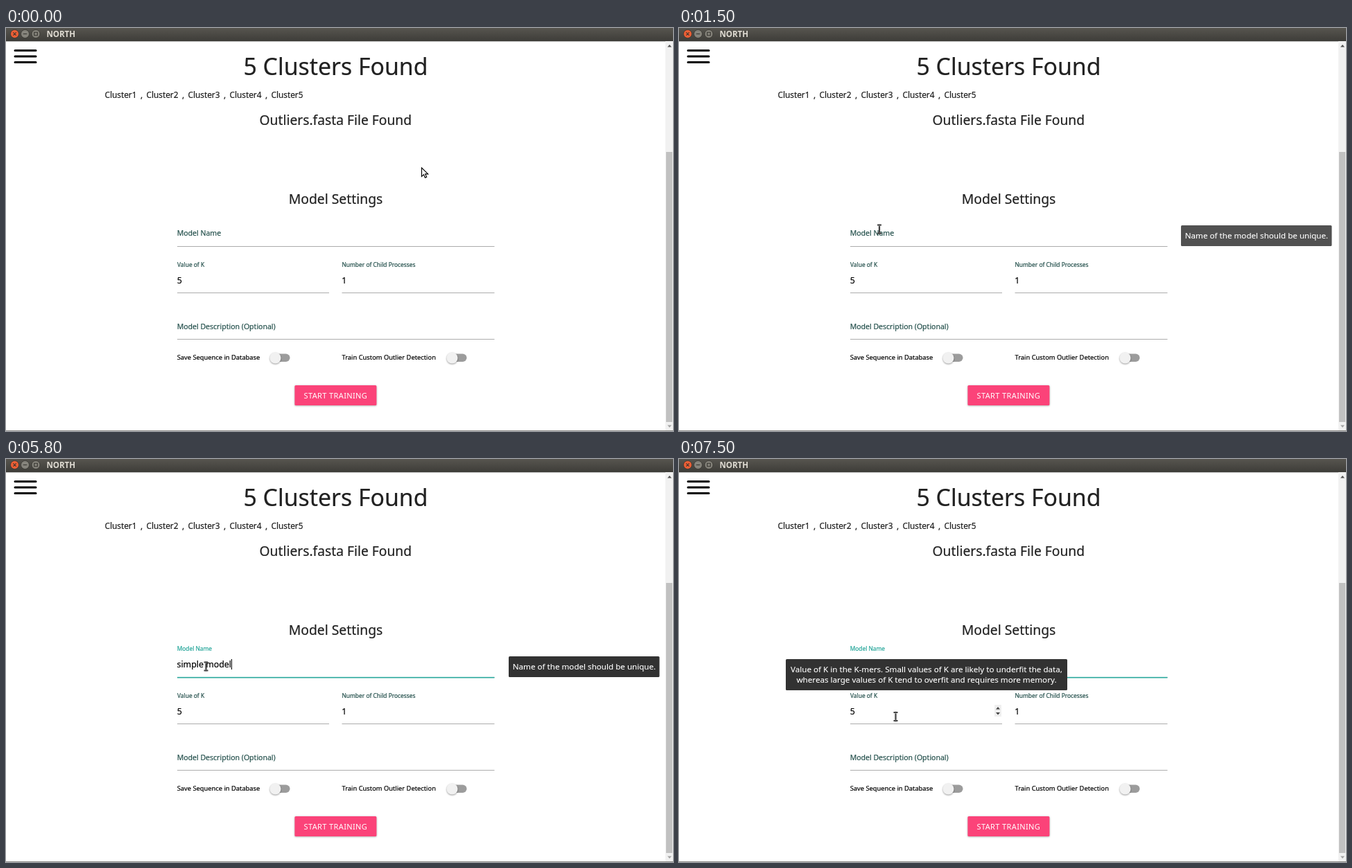
Animation of 962 by 582 pixels, one loop 8 s. Source, as an HTML page:

```html
<!DOCTYPE html>
<html lang="en">
<head>
<meta charset="utf-8">
<title>Model settings</title>
<style>
  html, body { margin: 0; width: 100%; height: 100%; overflow: hidden; background: #fff; }
  svg { display: block; width: 962px; height: 582px; }
  text {
    font-family: "Noto Sans", "Open Sans", sans-serif; white-space: pre;
    color: #212121; fill: currentColor; stroke: currentColor; stroke-width: .2px;
  }
  .center { text-anchor: middle; }
  .cluster { font-size: 11.8px; }
  .label { font-size: 10.52px; color: #24504c; }
  .small { font-size: 8.4px; color: #24504c; }
  .option { font-size: 9.32px; color: #000; }
  .value { font-size: 12.35px; color: #000; }
  .tip rect { fill: #323232; }
  .tip text { font-size: 11.62px; color: #fff; text-anchor: middle; stroke-width: .1px; }
  .line { fill: #9e9e9e; }
  .knob { fill: #f1f1f1; filter: drop-shadow(0 1px 1px rgba(0, 0, 0, .4)); }
  #button { fill: #fb4379; filter: drop-shadow(0 1.5px 1.2px rgba(0, 0, 0, .2)) drop-shadow(0 .5px 1.5px rgba(0, 0, 0, .15)); }
</style>
</head>
<body>
<svg viewBox="0 0 962 582">
  <defs>
    <linearGradient id="bar" x2="0" y2="1">
      <stop stop-color="#57554f"/>
      <stop offset="1" stop-color="#3d3c38"/>
    </linearGradient>
    <g id="switch">
      <rect x="-6" y="-6" width="27" height="11.5" rx="5.75" fill="#9c9c9c"/>
      <circle class="knob" r="8"/>
    </g>
  </defs>

  <!-- window frame -->
  <rect width="962" height="19.3" fill="url(#bar)"/>
  <g stroke="#35342f" stroke-width=".8">
    <circle cx="12.5" cy="8.5" r="6" fill="#ec5f35"/>
    <circle cx="27.5" cy="8.5" r="6" fill="#85837b"/>
    <circle cx="43" cy="8.5" r="6" fill="#85837b"/>
    <path d="M10.3 6.3l4.4 4.4m0-4.4l-4.4 4.4M24.8 8.5h5.4M40.7 6.2h4.6v4.6h-4.6z" fill="none" stroke-width="1.1"/>
  </g>
  <text x="58.5" y="13" font-size="11.5" font-weight="700" style="color:#dfdbd2; stroke:none">NORTH</text>
  <rect x="951" y="19" width="11" height="562" fill="#f1f1f1"/>
  <rect x="952" y="179" width="9" height="390" fill="#c1c1c1"/>
  <path d="M954 27.5h6l-3-3.5z" fill="#505050"/>
  <path d="M954 573.5h6l-3 3.5z" fill="#a3a3a3"/>
  <rect y="581" width="962" height="1" fill="#8f8e8b"/>
  <path d="M13 32.5h30M13 41h30M13 49.5h30" stroke="#000" stroke-width="3" stroke-linecap="round"/>

  <!-- headings -->
  <text class="center" x="475.5" y="68" font-size="33.8">5 Clusters Found</text>
  <g id="clusters"></g>
  <text class="center" x="475.3" y="140" font-size="19.25">Outliers.fasta File Found</text>
  <text class="center" x="475.5" y="254" font-size="19.35">Model Settings</text>

  <!-- form -->
  <rect class="line" x="247" y="315" width="457.5" height=".85"/>
  <rect class="line" x="247" y="382" width="219" height=".85"/>
  <rect class="line" x="484.5" y="382" width="220" height=".85"/>
  <rect class="line" x="247" y="449" width="457.5" height=".85"/>
  <rect id="focus" x="247" y="314.8" width="457.5" height="1.6" fill="#26a69a"/>
  <text class="label" id="nameLabel" x="246.7">Model Name</text>
  <text class="value" id="typed" x="246.5" y="301">simple model</text>
  <rect id="caret" x="247" y="289" width="1" height="15"/>
  <text class="small" x="247" y="344.5">Value of K</text>
  <text class="small" x="484.5" y="344.5">Number of Child Processes</text>
  <text class="value" x="246.7" y="368.5">5</text>
  <text class="value" x="484.2" y="368.5">1</text>
  <g id="spinner">
    <rect x="455" y="355" width="10" height="17" fill="#efefef"/>
    <path d="M457 361.5h6l-3-3.5zM457 366h6l-3 3.5z" fill="#444"/>
  </g>
  <text class="label" x="246.7" y="435">Model Description (Optional)</text>
  <text class="option" x="246.7" y="478.7">Save Sequence in Database</text>
  <text class="option" x="484.5" y="478.7">Train Custom Outlier Detection</text>
  <use href="#switch" x="388.5" y="476.5"/>
  <use href="#switch" x="643.5" y="476.5"/>
  <rect id="button" x="416.4" y="516" width="118" height="29" rx="1.6"/>
  <text class="center" x="475.4" y="535" font-size="11" letter-spacing=".37" style="color:#fff; stroke:none">START TRAINING</text>

  <!-- tooltips -->
  <g class="tip" id="nameTip">
    <rect x="725" y="285" width="217.5" height="30" rx="1.6"/>
    <text x="834" y="304">Name of the model should be unique.</text>
  </g>
  <g class="tip" id="kTip">
    <rect x="154" y="289" width="406" height="45" rx="1.6"/>
    <text x="357" y="308">Value of K in the K-mers. Small values of K are likely to underfit the data,</text>
    <text x="357" y="322.5">whereas large values of K tend to overfit and requires more memory.</text>
  </g>

  <!-- pointers, both with the hot spot at 0,0 -->
  <path id="arrow" d="M.5.8v12.7l3-2.8 2 4.5 2.2-1-2-4.3h4z" fill="#fff" stroke="#000" stroke-width="1.15"/>
  <g id="beam" fill="none">
    <path d="M-2.8-6h1.8l1 .8 1-.8h1.8M-2.8 6h1.8l1-.8 1 .8h1.8M0-5.5v11" stroke="#000" stroke-width="2.2"/>
    <path d="M-2.3-6h1.3l1 .8 1-.8h1.3M-2.3 6h1.3l1-.8 1 .8h1.3M0-5.5v11" stroke="#fff" stroke-width=".5"/>
  </g>
</svg>
<script>
  const LOOP = 8000;
  const $ = id => document.getElementById(id);
  const shown = on => ({ visibility: on ? 'visible' : 'hidden' });
  const at = (x, y) => ({ transform: `translate(${x}px, ${y}px)` });

  function addSvg(parent, tag, content, attributes = {}) {
    const el = document.createElementNS('http://www.w3.org/2000/svg', tag);
    for (const [name, value] of Object.entries(attributes)) el.setAttribute(name, value);
    el.textContent = content;
    parent.append(el);
    return el;
  }

  // Plays a table of [ms, properties] rows, each held until the next one.
  function play(el, rows) {
    const frames = rows.map(([ms, props]) => ({ ...props, offset: ms / LOOP, easing: 'step-end' }));
    frames.push({ ...rows.at(-1)[1], offset: 1 });
    el.animate(frames, { duration: LOOP, iterations: Infinity });
  }

  // Visible between the given pairs of times.
  function showDuring(el, ...spans) {
    const rows = spans[0][0] > 0 ? [[0, shown(false)]] : [];
    for (const [from, to] of spans) {
      rows.push([from, shown(true)]);
      if (to < LOOP) rows.push([to, shown(false)]);
    }
    play(el, rows);
  }

  for (let i = 0; i < 5; i++) {
    const place = x => ({ x: x + 60 * i, y: 101, class: 'cluster' });
    addSvg($('clusters'), 'text', 'Cluster' + (i + 1), place(142.5));
    if (i < 4) addSvg($('clusters'), 'text', ',', place(194));
  }

  // Pointer: one eased sweep to the left, then down into the fields.
  const sweep = Array.from({ length: 9 }, (_, i) => {
    const p = (i + 1) / 9;
    const eased = p * p * (3 - 2 * p);
    return [300 + 100 * i, at(599 - 313 * eased, 201 + 48 * eased)];
  });
  play($('arrow'), [[0, at(599, 201)], ...sweep, [1200, at(281, 262)], [1300, at(286, 275)]]);
  showDuring($('arrow'), [0, 1400]);
  play($('beam'), [
    [0, at(288, 284)], [1500, at(289, 290.5)], [1600, at(289, 296)], [1700, at(288.5, 299.5)],
    [6900, at(290, 304)], [7000, at(294, 318)], [7100, at(301, 340)], [7200, at(308, 360)],
    [7400, at(311, 368)], [7500, at(312.5, 372)]
  ]);
  showDuring($('beam'), [1400, LOOP]);

  // Focused field
  const label = (y, fontSize, color) => ({ ...at(0, y), fontSize, color });
  play($('nameLabel'), [
    [0, label(300.3, '10.52px', '#24504c')],
    [2800, label(279.2, '8.5px', '#26a69a')],
    [2900, label(276.8, '8.35px', '#26a69a')]
  ]);
  showDuring($('focus'), [2800, LOOP]);
  showDuring($('spinner'), [7200, LOOP]);

  // Typing: [ms, number of letters]
  const typed = $('typed');
  const strokes = [
    [3700, 1], [4100, 2], [4300, 3], [4600, 4], [4700, 5], [4800, 6],
    [5000, 7], [5300, 8], [5400, 9], [5700, 11], [5800, 12]
  ];
  const caretAfter = n => at(Math.round(typed.getSubStringLength(0, n) - .5), 0);
  play($('caret'), [[0, at(0, 0)], ...strokes.map(([ms, n]) => [ms, caretAfter(n)])]);
  showDuring($('caret'), [2800, 3200], [3700, 6400], [6900, LOOP]);

  const letters = [...typed.textContent];
  typed.textContent = '';
  letters.forEach((letter, i) => {
    const [start] = strokes.find(([, n]) => n > i);
    showDuring(addSvg(typed, 'tspan', letter), [start, LOOP]);
  });

  // Tooltips fade while sliding
  const fade = (opacity, x, y) => ({ opacity, ...at(x, y) });
  play($('nameTip'), [
    [0, fade(0, -9, 0)], [1500, fade(.85, -1, 0)], [1600, fade(1, 0, 0)],
    [7200, fade(.4, -4.5, 0)], [7400, fade(0, -9, 0)]
  ]);
  play($('kTip'), [[0, fade(0, 0, 9)], [7400, fade(.75, 0, 2)], [7500, fade(1, 0, 0)]]);
</script>
</body>
</html>
```
